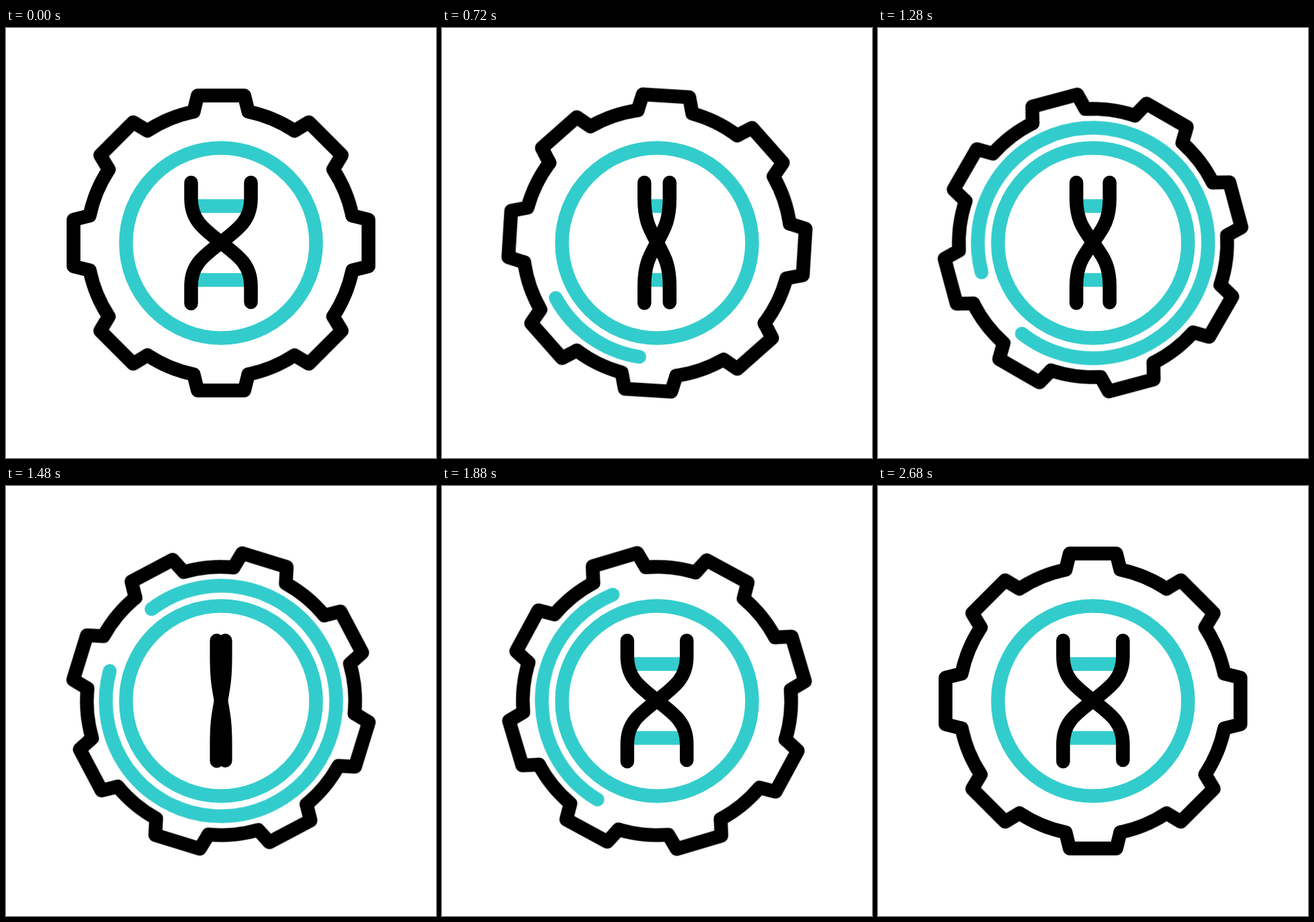
Write an HTML page without scripts that moves like this. It is 640 px wide and 640 px high and loops after 3000 ms.

```html
<!DOCTYPE html>
<html lang="en">
<head>
<meta charset="utf-8">
<title>Gene gear</title>
<style>
  @property --from { syntax: "<length>"; inherits: false; initial-value: 0px; }
  @property --to { syntax: "<length>"; inherits: false; initial-value: 0px; }

  html, body { margin: 0; width: 100%; height: 100%; overflow: hidden; background: #fff; }
  svg { display: block; width: 100%; height: 100%; }

  svg * {
    animation: 3s cubic-bezier(.333, 0, .667, 1) infinite;
  }
  .line { fill: none; stroke: #000; stroke-width: 20.5; stroke-linecap: round; stroke-linejoin: round; }
  .teal { stroke: #33cccc; }

  .gear { animation-name: turn; }
  @keyframes turn {
    0%, 6.667% { transform: rotate(0deg); }
    16% { transform: rotate(-6deg); }
    76% { transform: rotate(187.8deg); }
    89.333%, 100% { transform: rotate(180deg); }
  }

  /* The arc grows and shrinks along its circle while the circle itself turns. */
  .orbit { animation-name: orbit; }
  @keyframes orbit {
    0%, 16% { transform: rotate(90deg); }
    76%, 100% { transform: rotate(270deg); }
  }
  .arc {
    stroke-dasharray: calc(var(--to) - var(--from)) 720px;
    stroke-dashoffset: calc(-1 * var(--from));
    animation-name: grow, shrink, show;
    animation-timing-function: cubic-bezier(.333, 0, .667, 1), cubic-bezier(.333, 0, .667, 1), step-end;
  }
  @keyframes grow {
    0%, 16% { --to: 0px; }
    49.333%, 100% { --to: 360px; }
  }
  @keyframes shrink {
    0%, 42.667% { --from: 0px; }
    76%, 100% { --from: 360px; }
  }
  @keyframes show {
    0% { visibility: hidden; }
    16.1% { visibility: visible; }
    76%, 100% { visibility: hidden; }
  }

  /* Each part of the helix swings over to its mirrored shape and back. */
  .helix {
    --falling: path("M275.5 230V254C275.5 286 294 299 320 319.3C346 339.6 364.5 352 364.5 384V408");
    --rising: path("M364.5 230V254C364.5 286 346 299 320 319.3C294 339.6 275.5 352 275.5 384V410");
  }
  .helix path { d: var(--a); animation-name: swing; }
  .rungs {
    --a: path("M277 265H363M277 375H363");
    --b: path("M363 265H277M363 375H277");
    stroke-linecap: butt;
  }
  .strand { --a: var(--falling); --b: var(--rising); }
  .other { --a: var(--rising); --b: var(--falling); }
  @keyframes swing {
    0%, 5.333% { d: var(--a); }
    34.333% { d: var(--b); }
    61.8% { d: var(--a); }
    89.667%, 100% { d: var(--b); }
  }
</style>
</head>
<body>
<svg viewBox="0 0 640 640">
  <defs>
    <path id="tooth" d="M-40.7-195.5L-34.7-219.5H34.7L40.7-195.5A199.7 199.7 0 0 1 109.46-167.02"/>
    <g id="pair">
      <use href="#tooth"/>
      <use href="#tooth" transform="rotate(45)"/>
    </g>
  </defs>
  <g transform="translate(320 320)">
    <g class="line gear">
      <use href="#pair"/>
      <use href="#pair" transform="rotate(90)"/>
      <use href="#pair" transform="rotate(180)"/>
      <use href="#pair" transform="rotate(270)"/>
    </g>
    <circle class="line teal" r="141.5"/>
    <g class="orbit">
      <circle class="line teal arc" r="171.5" pathLength="360"/>
    </g>
  </g>
  <g class="helix">
    <path class="line teal rungs"/>
    <path class="line strand"/>
    <path class="line other"/>
  </g>
</svg>
</body>
</html>
```
